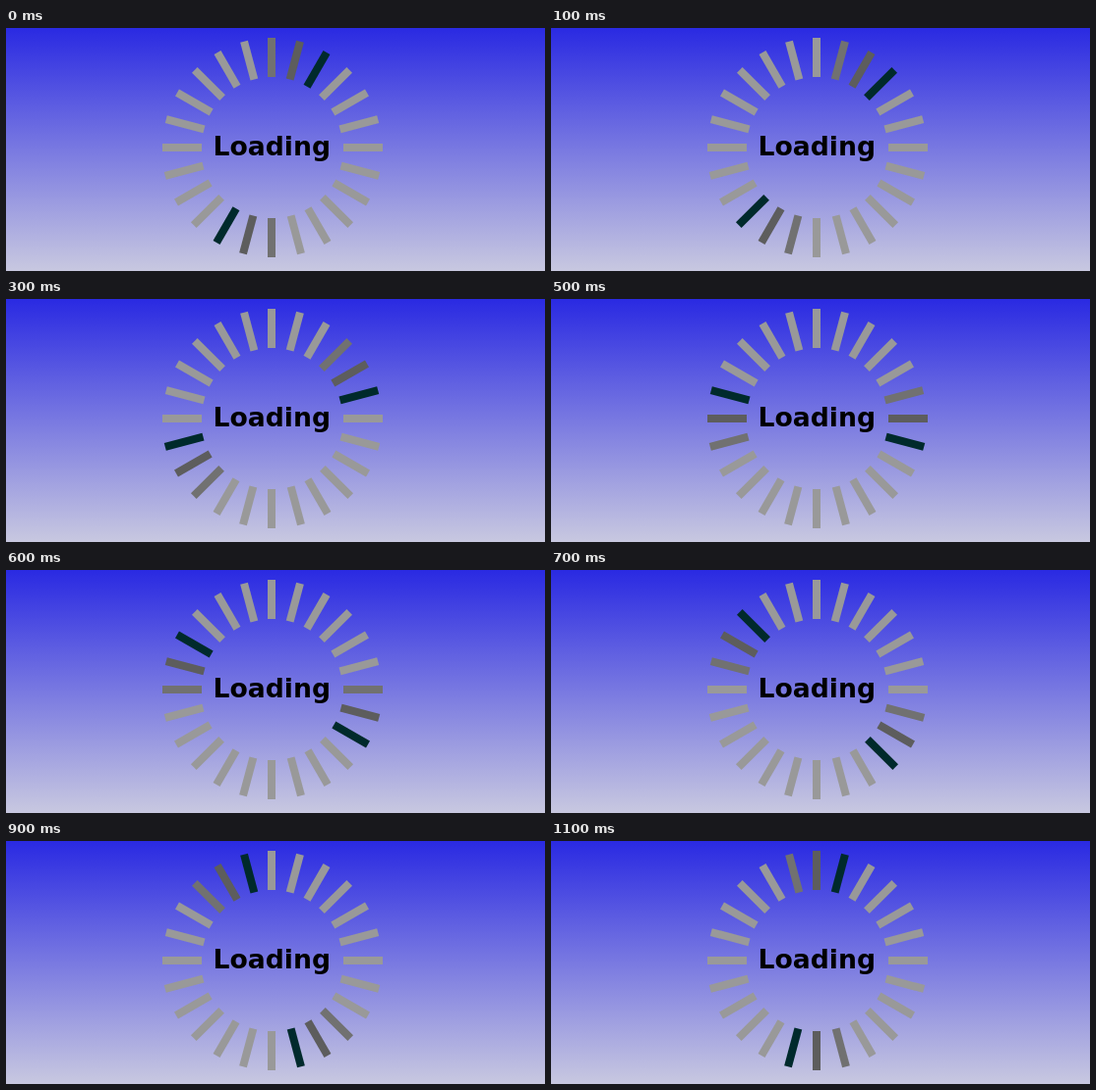
Write an HTML page that moves like this. It is 548x248 px and loops after 1200 ms.

```html
<!DOCTYPE html>
<html lang="en">
<head>
<meta charset="utf-8">
<title>Loading</title>
<style>
html, body { margin: 0; width: 100%; height: 100%; overflow: hidden; }
body { background: linear-gradient(#2a2ae2, #c8c8e0); }
svg { display: block; }
text { font: bold 26.67px "DejaVu Sans", Verdana, sans-serif; text-anchor: middle; }
</style>
</head>
<body>
<svg width="548" height="248" viewBox="0 0 548 248">
  <g id="ring"></g>
  <text x="270.3" y="130">Loading</text>
</svg>
<script>
const COUNT = 24, HALF = COUNT / 2, STEP_MS = 100;
const TRAIL = ['#002a2c', '#5d5d5d', '#717171'], IDLE = '#999';
const ring = document.getElementById('ring');

const bars = Array.from({ length: COUNT }, (_, i) => {
  const bar = document.createElementNS('http://www.w3.org/2000/svg', 'rect');
  // Every other quadrant sits one pixel further right.
  const cx = 270 + Math.floor(i / 6) % 2;
  const attrs = { x: -4, y: -112, width: 8, height: 40,
    transform: `translate(${cx} 122) rotate(${i * 360 / COUNT})` };
  for (const name in attrs) bar.setAttribute(name, attrs[name]);
  return ring.appendChild(bar);
});

// Two opposite heads turn clockwise, each followed by a fading trail.
function draw(time) {
  const head = 2 + Math.floor(time / STEP_MS) % HALF;
  bars.forEach((bar, i) => {
    const lag = (head - i + COUNT) % HALF;
    bar.setAttribute('fill', TRAIL[lag] || IDLE);
  });
}

const start = performance.now();
function frame() {
  draw(performance.now() - start);
  requestAnimationFrame(frame);
}
frame();
</script>
</body>
</html>
```
